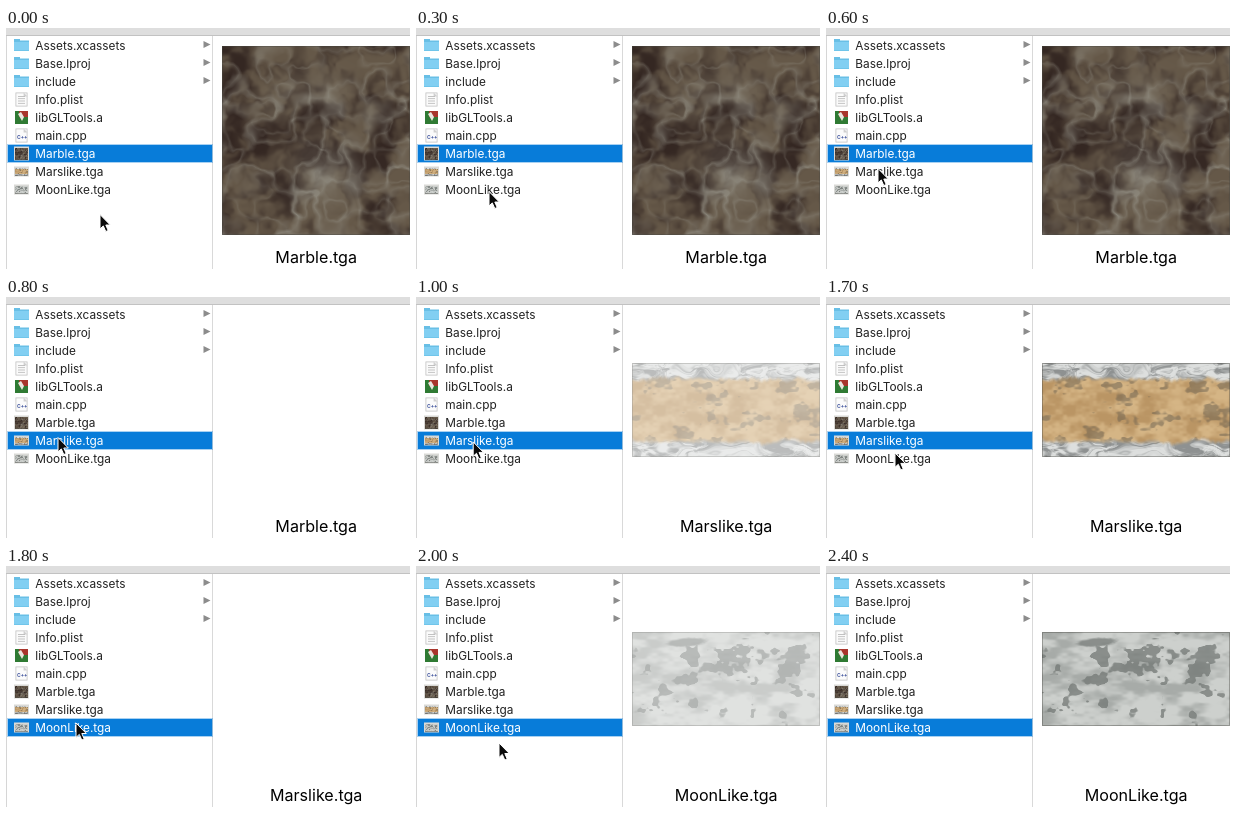
Write an HTML page with a canvas that moves like this. It is 404 px wide and 241 px high and loops after 2.6 s.

```html
<!DOCTYPE html>
<html lang="en">
<head>
<meta charset="utf-8">
<title>File browser</title>
<style>
  html, body { margin: 0; width: 100%; height: 100%; overflow: hidden; background: #fff; }
  canvas, svg { position: absolute; left: 0; top: 0; width: 404px; height: 241px; }
  text { font-family: Inter, Roboto, sans-serif; }
  .row { font-size: 11.85px; }
  .tag { font-size: 5px; font-weight: 700; fill: #3a4f9a; }
  #title { font-size: 16.1px; text-anchor: middle; fill: #000; }
</style>
</head>
<body>
<canvas id="stage" width="404" height="241"></canvas>
<svg id="over" viewBox="0 0 404 241">
  <text id="title" x="310.2" y="235.4"></text>
  <text class="tag" x="11" y="110.5">C++</text>
  <path id="cursor" d="M0 0V14.4L3.3 11.4L5.8 17L8.2 16L5.8 10.5H10.3Z"
    fill="#0a0a0a" stroke="#fff" stroke-width="1" stroke-linejoin="round"/>
</svg>
<script>
const LOOP = 2600, STEP = 100, ROW = 18, FADE = 333;
const names = ['Assets.xcassets', 'Base.lproj', 'include', 'Info.plist', 'libGLTools.a',
  'main.cpp', 'Marble.tga', 'Marslike.tga', 'MoonLike.tga'];
// Pointer stops: time, x, y
const stops = [[0, 94, 186.5], [600, 52, 140.5], [800, 52, 140.5], [1300, 65, 151.5],
  [1800, 70, 157], [2000, 83, 177], [2400, 112, 246], [LOOP, 112, 246]];
const picks = [{ at: -1000, row: 6 }, { at: 800, row: 7 }, { at: 1800, row: 8 }];

const ctx = document.getElementById('stage').getContext('2d');
const over = document.getElementById('over');
const title = document.getElementById('title');
const cursor = document.getElementById('cursor');

const mix = (a, b, k) => a + (b - a) * k;
const blend = (a, b, k) => a.map((v, i) => mix(v, b[i], k));
const smooth = (lo, hi, v) => {
  const k = Math.min(1, Math.max(0, (v - lo) / (hi - lo)));
  return k * k * (3 - 2 * k);
};
const bump = (x, y, cx, cy, rx, ry = rx) => Math.exp(-(((x - cx) / rx) ** 2) - ((y - cy) / ry) ** 2);

function hash(x, y) {
  const s = Math.sin(x * 127.1 + y * 311.7) * 43758.5453;
  return s - Math.floor(s);
}

function noise(x, y) {
  const i = Math.floor(x), j = Math.floor(y);
  const u = smooth(0, 1, x - i), v = smooth(0, 1, y - j);
  return mix(mix(hash(i, j), hash(i + 1, j), u), mix(hash(i, j + 1), hash(i + 1, j + 1), u), v);
}

const cloud = (x, y) =>
  .53 * noise(x, y) + .27 * noise(x * 2 + 9, y * 2 + 5) + .2 * noise(x * 4 + 31, y * 4 + 17);

// Thin bright lines where the noise crosses its middle value
const ridge = (x, y) => Math.max(0, 1 - 7 * Math.abs(noise(x, y) - .5));

function makeTexture(w, h, shade) {
  const c = document.createElement('canvas');
  c.width = w;
  c.height = h;
  const g = c.getContext('2d'), img = g.createImageData(w, h);
  for (let y = 0; y < h; y++)
    for (let x = 0; x < w; x++)
      img.data.set([...shade(x, y), 255], (y * w + x) * 4);
  g.putImageData(img, 0, 0);
  g.strokeStyle = 'rgba(70,70,66,.4)';
  g.strokeRect(.5, .5, w - 1, h - 1);
  return c;
}

function marbleShade(x, y) {
  const wx = x + 14 * cloud(x / 20, y / 20 + 40), wy = y + 14 * cloud(x / 20 + 70, y / 20);
  const body = blend([52, 39, 34], [101, 88, 72], smooth(.25, .75, cloud(wx / 24, wy / 24)));
  const light = bump(x, y, 102, 128, 30) + .45 * bump(x, y, 92, 42, 34, 18) + .3 * bump(x, y, 52, 58, 18);
  const veins = ridge(wx / 23 + 3, wy / 23) + .7 * ridge(wx / 17 + 50, wy / 17 + 8);
  const glow = veins * (.12 + .4 * cloud(x / 30 + 5, y / 30)) + light * (.2 + .5 * cloud(wx / 12, wy / 12));
  return blend(body, [150, 147, 136], Math.min(.75, glow));
}

function marsShade(x, y) {
  const sand = blend([186, 149, 100], [213, 181, 133], smooth(.25, .75, cloud(x / 15, y / 11)));
  const spots = smooth(.6, .72, cloud(x / 17 + 60, y / 11 + 4));
  const ground = blend(sand, [103, 93, 77], spots * .5);
  const swirl = cloud(x / 16 + 4 * noise(x / 20, y / 9), y / 5 + 3 * noise(x / 14 + 8, y / 8));
  const ice = blend([142, 145, 145], [221, 223, 222], smooth(.25, .7, swirl));
  const rim = Math.min(y, 94 - y) + 9 * (cloud(x / 11, y / 30) - .5);
  return blend(ice, ground, smooth(13, 19, rim));
}

function moonShade(x, y) {
  const dust = blend([167, 171, 168], [205, 208, 205], smooth(.25, .7, cloud(x / 22, y / 11)));
  const calm = .16 * bump(x, y, 105, 54, 32, 13) + .16 * smooth(74, 88, y) + .16 * smooth(16, 8, y);
  const spots = smooth(.56, .63, cloud(x / 15 + 20, y / 12 + 30) - calm);
  const streak = smooth(.35, .75, bump(x, y, 54, 10 - (x - 54) / 15, 24, 5) + .3 * (cloud(x / 8, y / 5) - .5));
  return blend(dust, [112, 117, 114], Math.max(spots, streak) * .72);
}

const marble = makeTexture(188, 189, marbleShade);
const mars = makeTexture(188, 94, marsShade);
const moon = makeTexture(188, 94, moonShade);
const pictures = { 6: marble, 7: mars, 8: moon };

function box(x, y, w, h, color) {
  ctx.fillStyle = color;
  ctx.fillRect(x, y, w, h);
}

function poly(color, ...p) {
  ctx.fillStyle = color;
  ctx.beginPath();
  for (let i = 0; i < p.length; i += 2) ctx.lineTo(p[i], p[i + 1]);
  ctx.fill();
}

function folder(y) {
  box(8, y - 6, 6, 3, '#69bfe6');
  box(8, y - 4.5, 15, 10.5, '#69bfe6');
  box(8, y - 3, 15, 8.3, '#82cff2');
  poly('#8c8c8c', 197.5, y - 4, 204.5, y - .5, 197.5, y + 3);
}

function page(y) {
  box(9.5, y - 7, 12, 14, '#c2c2c2');
  box(10.3, y - 6.2, 10.4, 12.4, '#fbfbfb');
  poly('#cfcfcf', 17.6, y - 7, 21.5, y - 3, 17.6, y - 3);
}

function thumb(pic, y, h) {
  box(8, y - h / 2 - .5, 15, h + 1, '#d9d9d6');
  ctx.drawImage(pic, 9, y - h / 2 + .5, 13, h - 1);
}

function icons() {
  for (let i = 0; i < 3; i++) folder(17 + i * ROW);
  page(71.5);
  for (let y = 68; y < 76; y += 2.3) box(12, y, 7, .8, '#b5b5b5');
  box(9, 83, 13, 13, '#2f7a33');
  box(13, 83, 9, 6, '#a8352c');
  poly('#e9e6de', 12, 86, 15, 84, 18, 89, 16, 93);
  page(107.5);
  thumb(marble, 125.5, 13);
  thumb(mars, 143.5, 9);
  thumb(moon, 161.5, 9);
}

const labels = names.map((name, i) => {
  const el = document.createElementNS('http://www.w3.org/2000/svg', 'text');
  el.textContent = name;
  el.setAttribute('class', 'row');
  el.setAttribute('x', 29.3);
  el.setAttribute('y', 21.6 + i * ROW);
  over.insertBefore(el, cursor);
  return el;
});

function pointer(t) {
  const i = stops.findIndex(s => s[0] > t);
  const [t0, ...a] = stops[i - 1], [t1, ...b] = stops[i];
  return blend(a, b, (t - t0) / (t1 - t0));
}

function draw(t) {
  const n = picks.filter(p => p.at <= t).length - 1;
  const { at, row } = picks[n];
  const alpha = Math.min(1, (t - at) / FADE);
  const shown = alpha > 0 ? row : picks[n - 1].row;
  const top = 9 + row * ROW;

  box(0, 0, 404, 241, '#fff');
  box(0, 0, 404, 7, '#dedede');
  box(0, 7, 404, 1, '#c2c2c2');
  box(0, 8, 1, 233, '#d6d6d6');
  box(206, 8, 1, 233, '#d9d9d9');
  box(1, top - 1, 206, 19, 'rgba(8,124,217,.35)');
  box(2, top, 204, 17, '#087cd9');
  icons();

  const pic = pictures[row];
  ctx.globalAlpha = alpha;
  ctx.drawImage(pic, 216, pic === marble ? 18 : 66);
  ctx.globalAlpha = 1;

  labels.forEach((el, i) => el.setAttribute('fill', i === row ? '#fff' : '#222'));
  title.textContent = names[shown];
  cursor.setAttribute('transform', `translate(${pointer(t)})`);
}

let last = -1;
const start = performance.now();
function tick() {
  const t = Math.floor(((performance.now() - start) % LOOP) / STEP) * STEP;
  if (t !== last) draw(last = t);
  requestAnimationFrame(tick);
}
tick();
</script>
</body>
</html>
```
